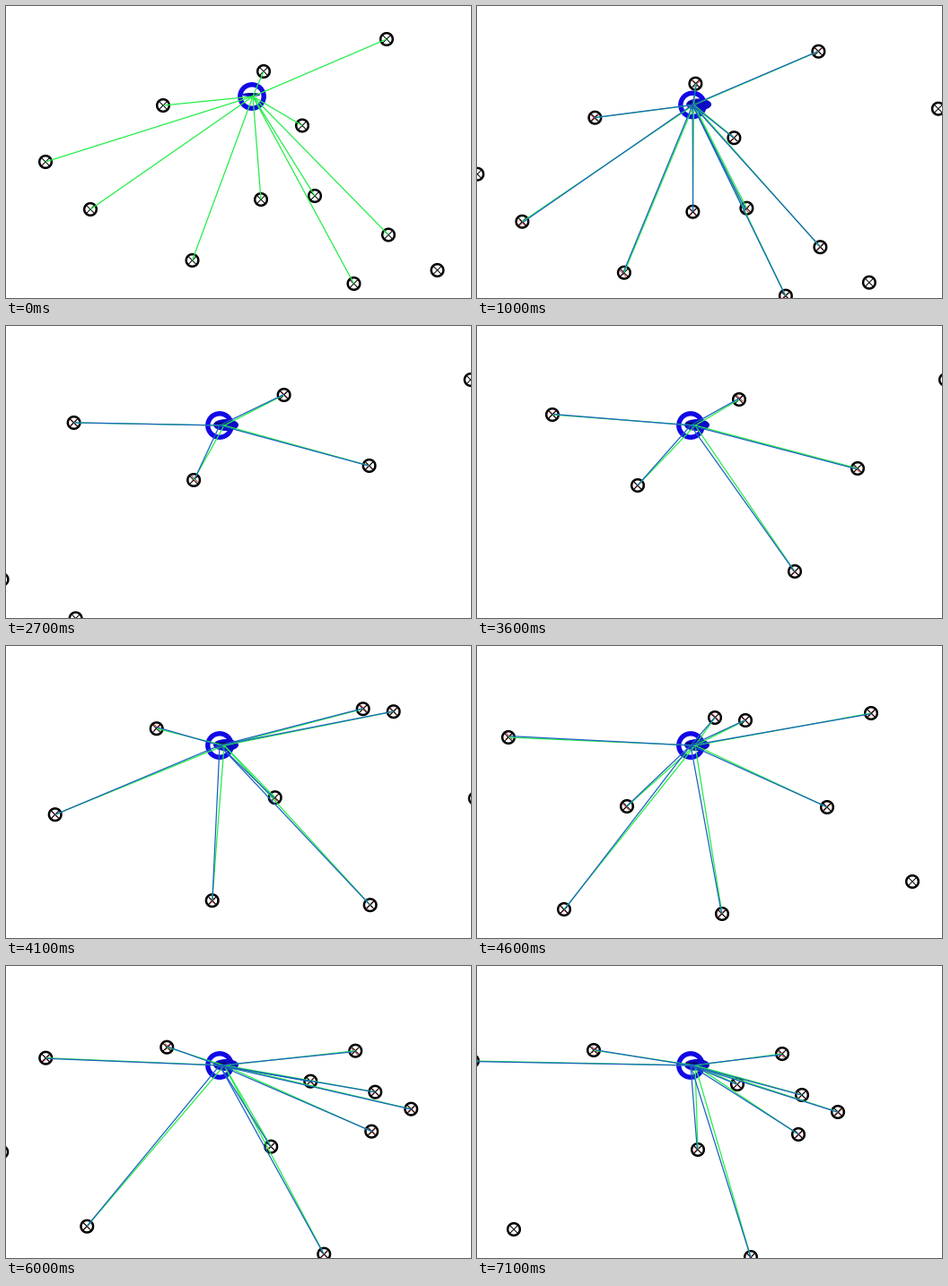
Write a matplotlib script that moves like this. It is 518x326 px and loops after 7200 ms.

```python
import numpy as np
import matplotlib.pyplot as plt
from matplotlib.animation import FuncAnimation
from matplotlib.collections import LineCollection
from matplotlib.patches import Circle, Ellipse

W, H = 518, 326
STEP, FRAMES = 100, 72
PX = 0.72  # points per pixel at 100 dpi
RANGE = 250

LANDMARKS = np.array([
    (424, 37), (287, 73), (175, 111), (330, 133.5), (44, 174), (94, 227),
    (284, 216), (344, 212), (207.5, 284), (426, 255.5), (387.5, 310),
    (480.5, 295), (557.5, 101), (658, 6), (866, -11), (753, 85), (998, 66),
    (928, 181), (1096, -33), (1130, -30), (1270, -38), (1221, 67),
    (1104, 186), (1316, 150), (1405, -50), (1565, -12), (1521, 61),
    (1580, 181), (1615, -46), (1637, 0), (1677, 19), (1633, 44)], float)

# Camera scroll: time in ms, shift left, shift down
SCROLL = np.array([
    (200, 0, 0), (1000, 43.6, 13.7), (1900, 175, 48), (3600, 574, 93),
    (4600, 831, 113), (5400, 1075, 131), (5800, 1184, 138),
    (6300, 1262, 143), (6500, 1262, 143), (7100, 1275, 144)], float)


def smooth(t, ts, vs):
    """Monotone cubic interpolation through a few points."""
    gaps = np.diff(ts)
    rate = np.diff(vs) / gaps
    slope = np.zeros(len(ts))
    for i in range(1, len(ts) - 1):
        a, b = rate[i - 1], rate[i]
        if a * b > 0:
            slope[i] = 2 * a * b / (a + b)
    t = np.clip(t, ts[0], ts[-1])
    i = min(np.searchsorted(ts, t, side="right") - 1, len(gaps) - 1)
    h = gaps[i]
    u = (t - ts[i]) / h
    return ((1 + 2 * u) * (1 - u) ** 2 * vs[i] + u * (1 - u) ** 2 * h * slope[i]
            + u * u * (3 - 2 * u) * vs[i + 1] + u * u * (u - 1) * h * slope[i + 1])


def camera(t):
    ts, xs, ys = SCROLL.T
    return np.array([-smooth(t, ts, xs), smooth(t, ts, ys)])


def robot(t):
    left = (1 - np.clip((t - 200) / 900, 0, 1)) ** 1.3
    return np.array([238 + 36 * left, 111 - 10 * left])


def rays(origin, points):
    near = np.hypot(*(points - origin).T) < RANGE
    return [(origin, p) for p in points[near]], near


def crosses(points, r):
    d, e = np.array([r, r]), np.array([r, -r])
    return [s for p in points for s in ((p - d, p + d), (p - e, p + e))]


def lines(color, width, z):
    coll = LineCollection([], colors=color, linewidths=width * PX, zorder=z)
    ax.add_collection(coll, autolim=False)
    return coll


fig = plt.figure(figsize=(W / 100, H / 100), dpi=100, facecolor="white")
ax = fig.add_axes([0, 0, 1, 1])
ax.set_xlim(0, W)
ax.set_ylim(H, 0)
ax.axis("off")

angle = np.linspace(0, 2 * np.pi, 41)
RING = 6.8 * np.column_stack([np.cos(angle), np.sin(angle)])
drift = np.random.default_rng(4).normal(0, 0.7, LANDMARKS.shape)

BLUE = "#1208e6"
body = ax.add_patch(Circle((0, 0), 13.2, fill=False, ec=BLUE, lw=5.4 * PX, zorder=1))
spread = ax.add_patch(Ellipse((0, 0), 20, 4, fc="#0d0bc4", ec="none", zorder=2))
heading = lines("#0a0a50", 1.4, 3)
guess_marks = lines("#d03030", 1, 4)
marks = lines("black", 1, 5)
rings = lines("black", 2.5, 5)
true_rays = lines("#22ee48", 1.25, 6)
guess_rays = lines("#1c62c0", 1.25, 7)


def draw(frame):
    t = frame * STEP
    points = LANDMARKS + camera(t)
    guesses = points + drift
    pos = robot(t)
    error = np.interp(t, [200, 1000, 1900], [0.2, 0.3, 1])
    grow = np.interp(t, [200, 1000], [0, 1])

    body.center = pos
    spread.set_center(pos + (-1 + 8 * grow, -2 + 1.5 * grow))
    spread.width, spread.height = 20 + 8 * grow, 4 + 9 * grow
    heading.set_segments([(pos + (-5, -3), pos + (8, -3))])

    rings.set_segments([p + RING for p in points])
    marks.set_segments(crosses(points, 4.4))
    segments, _ = rays(pos + (5 * error, 0), points)
    true_rays.set_segments(segments)

    # Estimates only exist once the robot has started
    segments, near = rays(pos, guesses)
    moving = t > 200
    guess_rays.set_segments(segments if moving else [])
    guess_marks.set_segments(crosses(guesses[near], 3.6) if moving else [])
    return body, spread, heading, rings, marks, guess_marks, true_rays, guess_rays


anim = FuncAnimation(fig, draw, frames=FRAMES, interval=STEP, repeat=True,
                     repeat_delay=0, blit=False)
plt.show()
```
